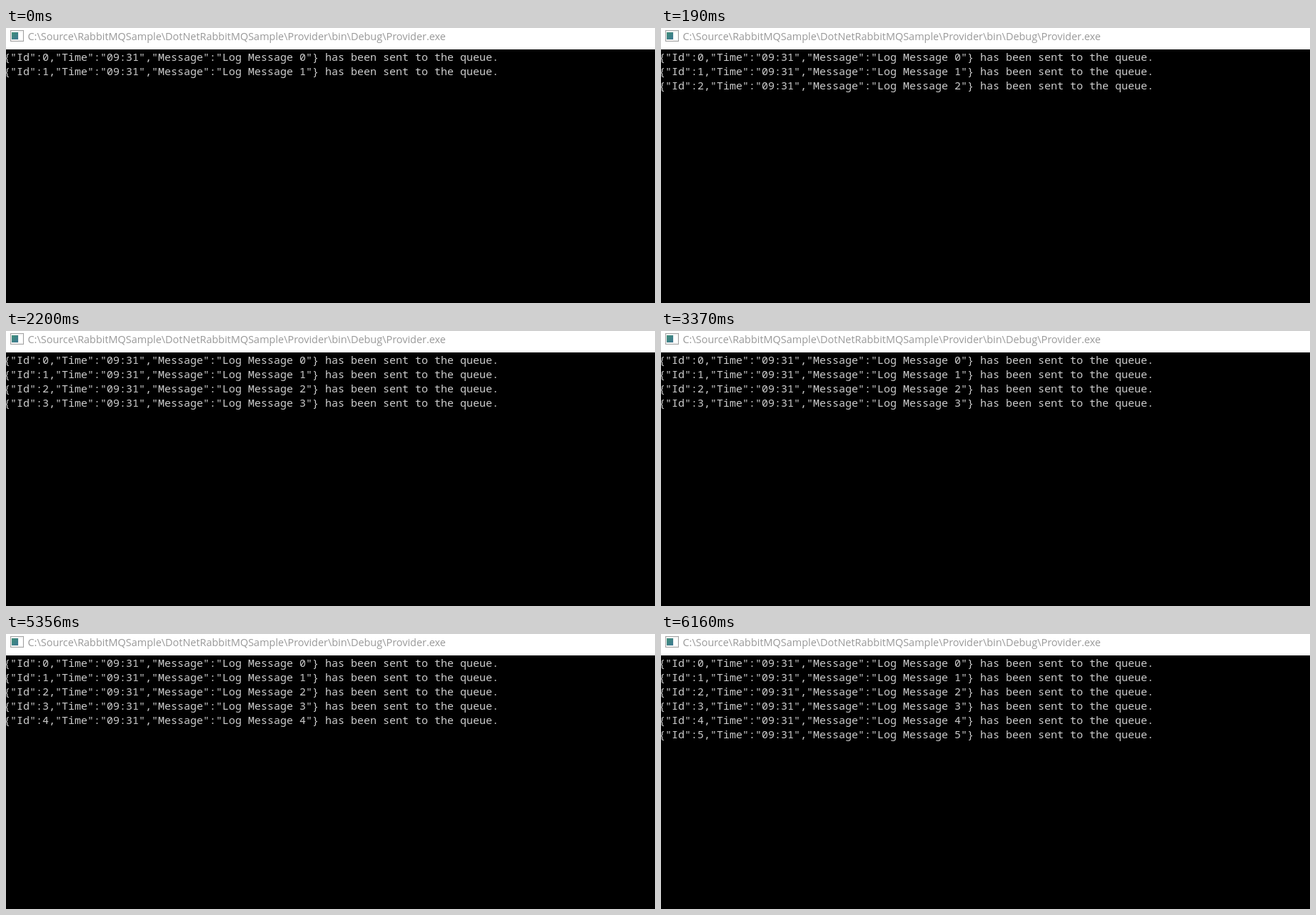
These frames come from a looping animation (909x385 px, 8 s). An HTML page:

```html
<!DOCTYPE html>
<html lang="en">
<head>
<meta charset="utf-8">
<title>Message provider console</title>
<style>
  html, body { margin: 0; width: 100%; height: 100%; overflow: hidden; background: #000; }
  svg { display: block; }
  .title { font: 14.45px "Open Sans", "Noto Sans", sans-serif; fill: #999; }
  .log { font: 15px "Noto Sans Mono", monospace; fill: #ccc; white-space: pre; }
</style>
</head>
<body>
<svg width="909" height="385">
  <defs>
    <linearGradient id="screen" x2="1" y2="1">
      <stop offset="0" stop-color="#3f8f78"/>
      <stop offset="1" stop-color="#3d7793"/>
    </linearGradient>
  </defs>
  <rect width="909" height="30" fill="#fff"/>
  <rect x="6.5" y="3.5" width="18" height="15" fill="#f4f4f4" stroke="#a2a2a2"/>
  <rect x="8" y="6" width="9" height="10" fill="url(#screen)"/>
  <rect x="18" y="6" width="5" height="10" fill="#fff"/>
  <text class="title" x="30.5" y="17">C:\Source\RabbitMQSample\DotNetRabbitMQSample\Provider\bin\Debug\Provider.exe</text>
  <g class="log" id="log"></g>
</svg>
<script>
  const LOOP = 8000;
  const sentAt = [0, 0, 190, 2200, 4150, 6160];
  const log = document.getElementById('log');

  const lines = sentAt.map((_, id) => {
    const line = document.createElementNS('http://www.w3.org/2000/svg', 'text');
    const json = JSON.stringify({ Id: id, Time: '09:31', Message: `Log Message ${id}` });
    line.textContent = `${json} has been sent to the queue.`;
    line.setAttribute('x', -3);
    line.setAttribute('y', 46 + id * 20);
    return log.appendChild(line);
  });

  function draw() {
    const t = performance.now() % LOOP;
    lines.forEach((line, id) => {
      line.style.visibility = t >= sentAt[id] ? 'visible' : 'hidden';
    });
    requestAnimationFrame(draw);
  }
  draw();
</script>
</body>
</html>
```
